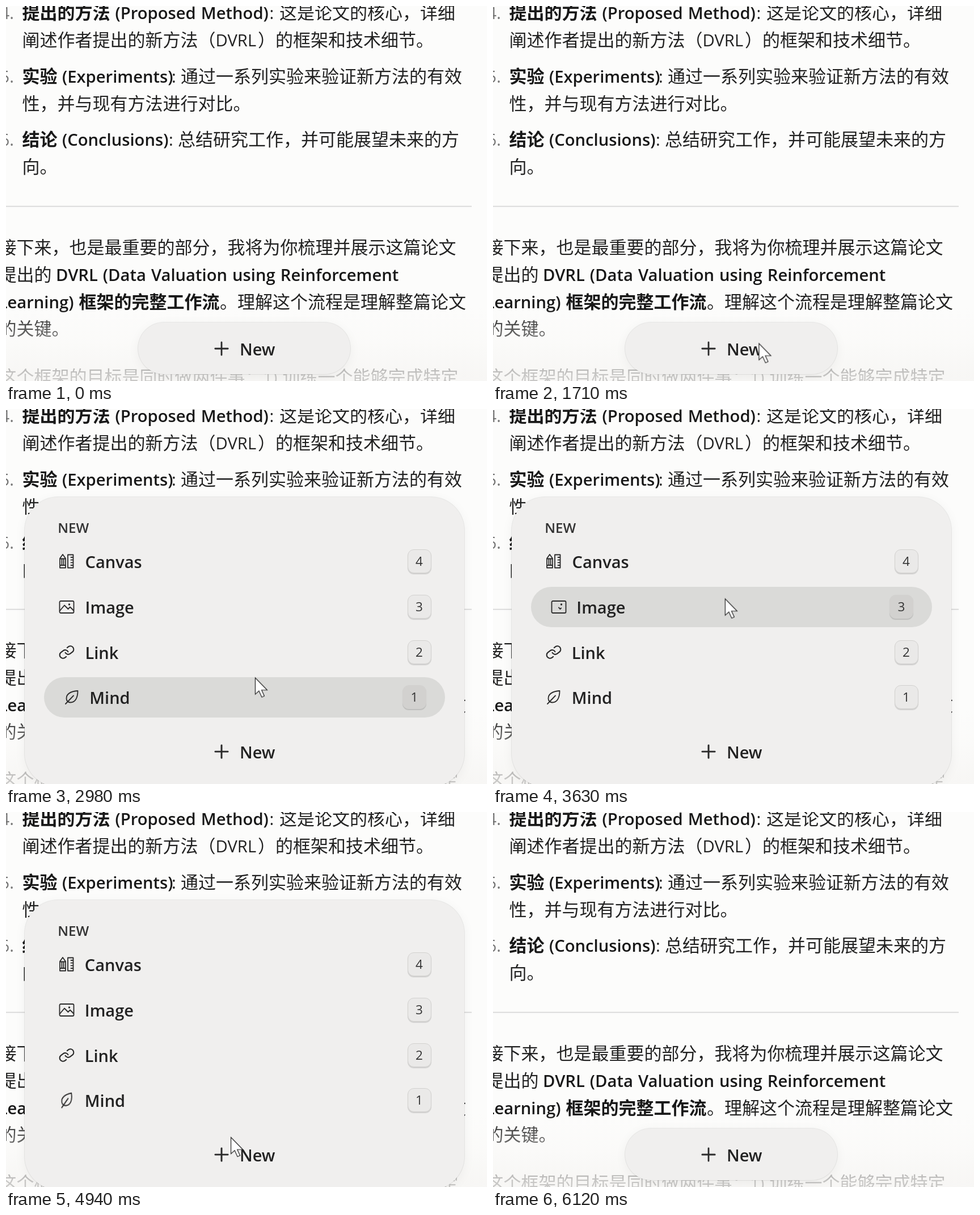
Animation of 848x660 px, one loop 6.74 s. Source, as an HTML page:

```html
<!DOCTYPE html>
<html lang="zh-CN">
<head>
<meta charset="utf-8">
<title>New menu</title>
<style>
@property --top { syntax: "<length>"; inherits: true; initial-value: 557px; }
@property --w { syntax: "<length>"; inherits: true; initial-value: 374px; }
@property --h { syntax: "<number>"; inherits: true; initial-value: 0; }

html, body { margin: 0; width: 100%; height: 100%; overflow: hidden; background: #fcfcfb; }
.stage { position: relative; width: 848px; height: 660px; overflow: hidden; background: #fcfcfb; }
.stage, .page { font-family: "Open Sans", "Noto Sans", sans-serif; }
.loop { animation: 6740ms linear infinite; }

/* article */
.page { position: absolute; inset: 0; font-size: 31px; fill: #222; text-spacing-trim: space-all; }
.page text { font-family: "Noto Sans CJK SC", "Noto Sans CJK", sans-serif; white-space: pre; }
.page .b { font-weight: 700; fill: #181818; }
.page .l { font-family: "Open Sans", "Noto Sans", sans-serif; font-size: 29.2px; }
.page .l.b { font-weight: 600; word-spacing: 1.5px; }
.page .n { fill: #777; text-anchor: end; }
.fade {
  position: absolute; inset: 530px 0 0;
  background: linear-gradient(rgba(252,252,251,0), rgba(249,248,246,.38) 45%, rgba(246,245,243,.78) 92%);
}

/* panel */
.panel {
  position: absolute; top: var(--top); bottom: 12px;
  left: calc(420px - var(--w) / 2); width: var(--w);
  border-radius: 46px; overflow: hidden; background: #f0efee;
  box-shadow: 0 0 0 1px rgba(0,0,0,.07), 0 4px 20px rgba(0,0,0,.05);
  animation-name: rise, widen;
}
.view { position: absolute; top: calc(0px - var(--top)); left: 0; right: 0; height: 660px; }
.menu { position: absolute; inset: 0; animation-name: reveal; }
.head {
  position: absolute; left: 58px; top: 192px;
  font: 600 24px/33px "Open Sans", "Noto Sans", sans-serif; color: #333;
}
.row { position: absolute; left: 34px; right: 34px; height: 71px; }
.row::before {
  content: ""; position: absolute; inset: 0; border-radius: 36px;
  background: #dadad8; opacity: var(--h);
}
.row > * { position: absolute; }
.icon {
  left: calc(26.5px + var(--h) * 8.5px); top: 21px; width: 28px; height: 28px; overflow: visible;
  fill: none; stroke: #2a2a2a; stroke-width: 1.8; stroke-linecap: round; stroke-linejoin: round;
}
.name {
  left: calc(72.3px + var(--h) * 8.5px); top: 0; color: #222;
  font-size: 29px; font-weight: 600; line-height: 71px;
}
.key {
  right: calc(24px + var(--h) * 8.5px); top: 14px; width: 42px; height: 42px; box-sizing: border-box;
  border: 1px solid #d2d1cf; border-radius: 11px; color: #333;
  background: color-mix(in srgb, #d2d1cf calc(var(--h) * 100%), #eae9e8);
  box-shadow: 0 2px 1px rgba(0,0,0,.13);
  font-size: 22.5px; line-height: 40px; text-align: center;
}
.add .name { left: calc(50% - 8px); }
.add .icon { left: calc(50% - 54.5px); stroke-width: 2.8; animation-name: spin; }

.canvas { top: 233px; animation-name: canvas; }
.image { top: 312.5px; animation-name: image; }
.link { top: 392.5px; animation-name: link; }
.mind { top: 472px; animation-name: mind; }
.add { top: 568px; animation-name: add; }

.pencil { transform-origin: 7px 25px; animation-name: tilt; }
.hills { stroke-dasharray: 1 2; animation-name: draw; }
.leaf { transform-origin: 14px 14px; animation-name: sway; }
.cursor { position: absolute; left: 0; top: 0; width: 24px; height: 38px; overflow: visible; animation-name: travel; }

@keyframes rise {
  0%, 25.4% { --top: 557px; bottom: 12px; border-radius: 46px; animation-timing-function: cubic-bezier(.2,.8,.3,1); }
  28.6%, 86% { --top: 155px; bottom: -5px; border-radius: 59px; animation-timing-function: cubic-bezier(.3,0,.2,1); }
  90.4%, 100% { --top: 557px; bottom: 12px; border-radius: 46px; }
}
@keyframes widen {
  0%, 25.4% { --w: 374px; animation-timing-function: cubic-bezier(.16,1,.3,1); }
  33.4%, 86% { --w: 775px; animation-timing-function: cubic-bezier(.3,0,.2,1); }
  90.4%, 100% { --w: 374px; }
}
@keyframes reveal {
  0%, 25.4% { opacity: 0; }
  28%, 86% { opacity: 1; }
  88.3%, 100% { opacity: 0; }
}

/* hover windows */
@keyframes canvas {
  0%, 55.8% { --h: 0; }
  56.7%, 61.6% { --h: 1; }
  62.2%, 100% { --h: 0; }
}
@keyframes image {
  0%, 52.8% { --h: 0; }
  53.7%, 55.5% { --h: 1; }
  56.4%, 62.2% { --h: 0; }
  62.8%, 63.9% { --h: 1; }
  64.7%, 100% { --h: 0; }
}
@keyframes link {
  0%, 45.7% { --h: 0; }
  46.6%, 52.5% { --h: 1; }
  53.4%, 63.9% { --h: 0; }
  64.7%, 68% { --h: 1; }
  68.8%, 100% { --h: 0; }
}
@keyframes mind {
  0%, 42.7% { --h: 0; }
  43.5%, 45.7% { --h: 1; }
  46.6%, 68.2% { --h: 0; }
  69.1%, 72% { --h: 1; }
  72.9%, 100% { --h: 0; }
}
@keyframes add {
  0%, 25.4% { --h: 0; }
  26.6%, 42.6% { --h: 1; }
  43.5%, 74.2% { --h: 0; }
  75.1%, 84.3% { --h: 1; }
  85.2%, 100% { --h: 0; }
}

/* icon motion */
@keyframes spin {
  0%, 26.4% { transform: none; }
  28.9% { transform: rotate(25deg) scale(.88); }
  33%, 74.4% { transform: rotate(90deg); animation-timing-function: ease-in-out; }
  80%, 100% { transform: rotate(180deg); }
}
@keyframes tilt {
  0%, 55.8% { transform: none; }
  58.5%, 62.2% { transform: rotate(11deg); }
  65.5%, 100% { transform: none; }
}
@keyframes draw {
  0%, 52.79% { stroke-dashoffset: 0; }
  52.8% { stroke-dashoffset: 1; }
  59%, 62.19% { stroke-dashoffset: 0; }
  62.2%, 63.8% { stroke-dashoffset: .99; }
  72%, 100% { stroke-dashoffset: 0; }
}
@keyframes sway {
  0%, 68.2% { transform: none; }
  70.6% { transform: rotate(9deg); }
  73.3% { transform: rotate(-8deg) scaleX(.95); }
  76%, 100% { transform: none; }
}

@keyframes travel {
  0%, 14.97% { transform: translate(38px, 35px); visibility: hidden; }
  14.98% { transform: translate(38px, 35px); visibility: visible; animation-timing-function: cubic-bezier(.4,0,.5,1); }
  24.63% { transform: translate(467px, 588px); }
  28.93% { transform: translate(475px, 619px); animation-timing-function: ease-in-out; }
  33.1%, 41.6% { transform: translate(472px, 607px); }
  44.21% { transform: translate(439px, 473px); animation-timing-function: ease-out; }
  51.04% { transform: translate(418px, 388px); animation-timing-function: ease-in-out; }
  57.3% { transform: translate(396px, 258px); }
  59.2% { transform: translate(388px, 262px); }
  63.65% { transform: translate(388px, 411px); }
  72.1% { transform: translate(394px, 554px); }
  73.3% { transform: translate(396px, 572px); animation-timing-function: ease-out; }
  78.6%, 82.8% { transform: translate(424px, 603px); animation-timing-function: ease-in; }
  88.4% { transform: translate(3px, 16px); visibility: visible; }
  88.41%, 100% { transform: translate(3px, 16px); visibility: hidden; }
}
</style>
</head>
<body>
<div class="stage">
  <svg class="page" width="848" height="660">
    <text class="l n" x="14" y="23">4.</text>
    <text class="b" x="28.5" y="23">提出的方法</text>
    <text class="l b" x="192.5" y="23">(Proposed Method)</text>
    <text class="l" x="464.5" y="23">:</text>
    <text x="482" y="23">这是论文的核心，详细</text>
    <text x="28.5" y="71">阐述作者提出的新方法（</text>
    <text class="l" x="369.5" y="71">DVRL</text>
    <text x="444" y="71">）的框架和技术细节。</text>

    <text class="l n" x="14" y="135">5.</text>
    <text class="b" x="28.5" y="135">实验</text>
    <text class="l b" x="99" y="135">(Experiments)</text>
    <text class="l" x="292" y="135">:</text>
    <text x="308" y="135">通过一系列实验来验证新方法的有效</text>
    <text x="28.5" y="183">性，并与现有方法进行对比。</text>

    <text class="l n" x="14" y="246">6.</text>
    <text class="b" x="28.5" y="246">结论</text>
    <text class="l b" x="99" y="246">(Conclusions)</text>
    <text class="l" x="287" y="246">:</text>
    <text x="303" y="246">总结研究工作，并可能展望未来的方</text>
    <text x="28.5" y="294">向。</text>

    <path d="M0 352.7H821" stroke="#d8d8d7" stroke-width="1.7"/>

    <text x="-12.5" y="436">接下来，也是最重要的部分，我将为你梳理并展示这篇论文</text>
    <text x="-12.5" y="484">提出的</text>
    <text class="l b" x="88" y="484">DVRL (Data Valuation using Reinforcement</text>
    <text class="l b" x="119.5" y="532" text-anchor="end">Learning)</text>
    <text class="b" x="128.5" y="532">框架的完整工作流</text>
    <text x="377" y="532">。理解这个流程是理解整篇论文</text>
    <text x="-12.5" y="579">的关键。</text>
    <text x="-12.5" y="664">这个框架的目标是同时做两件事：</text>
    <text class="l" x="453" y="664">1)</text>
    <text x="487.5" y="664">训练一个能够完成特定</text>
  </svg>
  <div class="fade"></div>

  <div class="panel loop">
    <div class="view">
      <div class="menu loop">
        <div class="head">NEW</div>
        <div class="row canvas loop">
          <svg class="icon" viewBox="0 0 28 28">
            <path class="pencil loop" d="M2 25.5V9l5-7 5 7v16.5zM2 9.5h10M2 21h10M5.4 10v11M8.6 10v11"/>
            <path d="M16 2.5h9.5v23H16zM21.5 7h4M21.5 11.7h4M21.5 16.3h4M21.5 21h4"/>
          </svg>
          <span class="name">Canvas</span><span class="key">4</span>
        </div>
        <div class="row image loop">
          <svg class="icon" viewBox="0 0 28 28">
            <rect x="1.5" y="4" width="25" height="21" rx="2"/>
            <circle cx="18.5" cy="10" r=".8"/>
            <path class="hills loop" pathLength="1" d="M16.5 18L10 11.5 2 21"/>
            <path class="hills loop" pathLength="1" d="M16.5 18L20 14.5 26 20.5"/>
          </svg>
          <span class="name">Image</span><span class="key">3</span>
        </div>
        <div class="row link loop">
          <svg class="icon" viewBox="0 0 24 24">
            <g transform="rotate(8 12 12)">
              <path d="M10 13a5 5 0 0 0 7.54.54l3-3a5 5 0 0 0-7.07-7.07l-1.72 1.71"/>
              <path d="M14 11a5 5 0 0 0-7.54-.54l-3 3a5 5 0 0 0 7.07 7.07l1.71-1.71"/>
            </g>
          </svg>
          <span class="name">Link</span><span class="key">2</span>
        </div>
        <div class="row mind loop">
          <svg class="icon" viewBox="0 0 28 28">
            <path class="leaf loop" d="M24.5 3C12 4 4.5 8.5 4.5 16.5c0 4 3 7 7 7 8.5 0 13-8 13-20.5zM3 26L17 11.5"/>
          </svg>
          <span class="name">Mind</span><span class="key">1</span>
        </div>
      </div>
      <div class="row add loop">
        <svg class="icon loop" viewBox="0 0 28 28"><path d="M14 2.8v22.4M2.8 14h22.4"/></svg>
        <span class="name">New</span>
      </div>
    </div>
  </div>

  <svg class="cursor loop" viewBox="0 0 24 38">
    <path d="M.5.5V29.5L7 23.5l5 11 4.5-2-4.8-10.5H21.5z" fill="#fff" stroke="#222" stroke-width="1.2"/>
  </svg>
</div>
</body>
</html>
```
